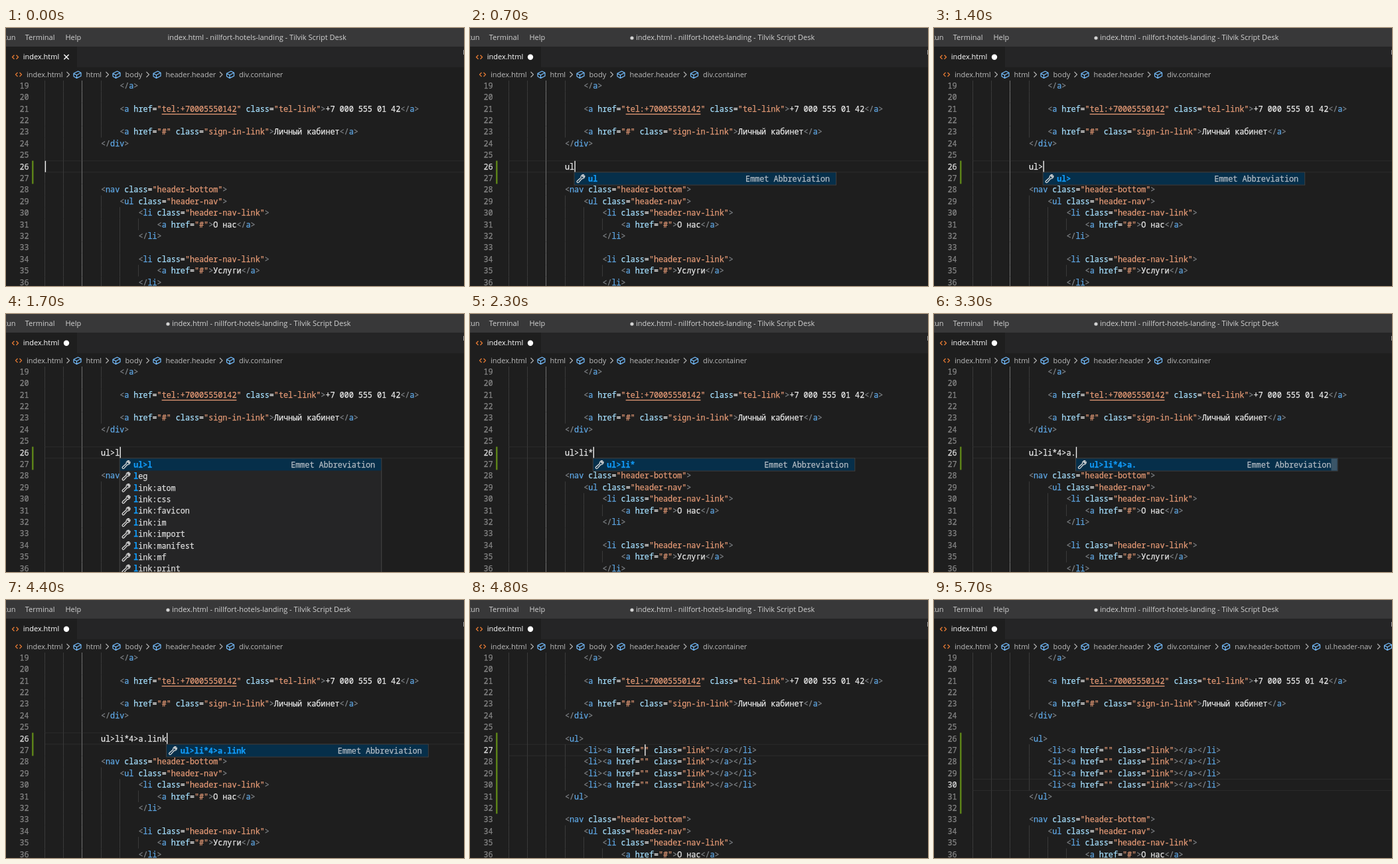
These frames come from a looping animation (690x388 px, 5800 ms). An HTML page with a canvas:

```html
<!DOCTYPE html>
<html lang="en">
<head>
<meta charset="utf-8">
<title>Editor</title>
<style>
html, body { margin: 0; width: 100%; height: 100%; overflow: hidden; background: #1e1e1e; }
canvas { display: block; width: 690px; height: 388px; }
</style>
</head>
<body>
<canvas id="stage"></canvas>
<script>
const W = 690, H = 388, LOOP = 5800;
const X0 = 58.4, CW = 7.05, LH = 17.4;
const MONO = '"Noto Sans Mono", monospace';
const UI = '11px "Open Sans", sans-serif';
const PROJECT = 'nillfort-hotels-landing - Tilvik Script Desk';

const canvas = document.getElementById('stage');
const ctx = canvas.getContext('2d');
const dpr = window.devicePixelRatio || 1;
canvas.width = W * dpr;
canvas.height = H * dpr;

const COLOR = {
  bracket: '#82868a', tag: '#5fa8e6', attr: '#a6e0ff',
  string: '#e59a76', text: '#ececec', ui: '#d2d2d2', crumb: '#bcbcbc'
};

// Each line: indent level, then code
const head = [
  [4, '</a>'],
  [4, ''],
  [4, '<a href="tel:+70005550142" class="tel-link">+7 000 555 01 42</a>'],
  [4, ''],
  [4, '<a href="#" class="sign-in-link">Личный кабинет</a>'],
  [3, '</div>'],
  [3, '']
];
const nav = [
  [3, '<nav class="header-bottom">'],
  [4, '<ul class="header-nav">'],
  [5, '<li class="header-nav-link">'],
  [6, '<a href="#">О нас</a>'],
  [5, '</li>'],
  [5, ''],
  [5, '<li class="header-nav-link">'],
  [6, '<a href="#">Услуги</a>'],
  [5, '</li>']
];
const item = [4, '<li><a href="" class="link"></a></li>'];
const list = [[3, '<ul>'], item, item, item, item, [3, '</ul>'], [3, '']];

const ABBR = 'ul>li*4>a.link';
const keys = [300, 500, 1200, 1500, 1900, 2000, 2500, 2700, 3000, 3200, 3700, 3900, 4000, 4200];
const INDENT = 200, EXPAND = 4700, CRUMBS = 5200;

const links = ['atom', 'css', 'favicon', 'im', 'import', 'manifest', 'mf', 'print'].map(s => 'link:' + s);
const hints = {
  'ul>l': ['leg', ...links],
  'ul>li': [...links, 'link:rss'],
  'ul>li*4>a': ['a:blank', 'a:link', 'a:mail', 'a:tel', 'abbr', 'acr', 'acronym', 'adr', 'area']
};

const wrench = new Path2D('M-5.6 3.4L0-1.6A3.5 3.5 0 0 1 4.4-5.6L2.2-3.4L3.4-2.2L5.6-4.4A3.5 3.5 0 0 1 1.6 0L-3.4 5.6A1.5 1.5 0 0 1-5.6 3.4Z');
const cube = new Path2D('M-5.5-1.7L1-5L5.5-2.7V2.3L-1 5.4L-5.5 2.8ZM-5.5-1.7L-1 .8L5.5-2.7M-1 .8V5.4');
const chevron = new Path2D('M-2-4L2 0L-2 4');
const angles = new Path2D('M-1.5-3L-4.5 0L-1.5 3M1.5-3L4.5 0L1.5 3');
const cross = new Path2D('M-3.6-3.6L3.6 3.6M3.6-3.6L-3.6 3.6');

const rowY = n => 208.3 + (n - 26) * LH;
const colX = c => X0 + c * CW;

function box(x, y, w, h, color) {
  ctx.fillStyle = color;
  ctx.fillRect(x, y, w, h);
}

function put(str, x, y, color, font = UI, align = 'left') {
  ctx.font = font;
  ctx.textAlign = align;
  ctx.fillStyle = color;
  ctx.fillText(str, x, y);
}

// Monospaced text, thickened slightly by a hairline stroke
function mono(str, x, y, color, weight = 400, align = 'left') {
  put(str, x, y + 4.2, color, weight + ' 11.75px ' + MONO, align);
  ctx.strokeStyle = color;
  ctx.lineWidth = 0.25;
  ctx.strokeText(str, x, y + 4.2);
}

function icon(path, x, y, color, width = 1.2) {
  ctx.save();
  ctx.translate(x, y);
  ctx.strokeStyle = color;
  ctx.lineWidth = width;
  ctx.lineJoin = 'round';
  ctx.stroke(path);
  ctx.restore();
}

function dot(x, y, r, color) {
  ctx.fillStyle = color;
  ctx.beginPath();
  ctx.arc(x, y, r, 0, 7);
  ctx.fill();
}

function drawCode(code, col, y) {
  let inTag = false, afterOpen = false;
  for (const [part] of code.matchAll(/<\/?|"[^"]*"|[a-z]+(?=[^<]*>)|>|=|\s+|[^<>"=\s]+/g)) {
    let color = COLOR.text;
    if (part[0] === '<') {
      color = COLOR.bracket;
      inTag = afterOpen = true;
    } else if (part === '>') {
      color = COLOR.bracket;
      inTag = false;
    } else if (inTag) {
      if (part[0] === '"') color = COLOR.string;
      else if (part !== '=') color = afterOpen ? COLOR.tag : COLOR.attr;
      afterOpen = false;
    }
    mono(part, colX(col), y, color);
    if (part.startsWith('"tel:')) box(colX(col + 1), y + 7.6, (part.length - 2) * CW, 1.3, COLOR.string);
    col += part.length;
  }
}

function drawEditor(lines, current, expanded) {
  box(X0, rowY(current) - 9, W, 1, '#2c2c2c');
  box(X0, rowY(current) + 8, W, 1, '#2c2c2c');
  lines.forEach(([level, code], i) => {
    const n = 19 + i, y = rowY(n);
    for (let g = 0; g < level; g++) {
      const bright = g === 2 && !expanded;
      box(Math.floor(colX(g * 4)), y - LH / 2, 1, LH, bright ? '#707070' : '#3a3a3a');
    }
    mono(n, 34.5, y, n === current ? '#dcdcdc' : '#858585', 400, 'right');
    drawCode(code, level * 4, y);
  });
  box(39, rowY(26) - LH / 2, 2.5, LH * (expanded ? 7 : 2), '#5c8218');
}

function drawPopup(abbr, x, slider) {
  const rows = [abbr, ...(hints[abbr] || [])];
  const match = abbr.match(/[a-z]*$/)[0].length;
  const top = 216.5, height = rows.length > 1 ? 190 : 20;
  box(x - 0.5, top, 395.5, height, '#454545');
  box(x + 0.5, top + 1, 393.5, height - 2, '#252526');
  box(x + 0.5, top + 1, 393.5, 18, '#062f4a');
  if (slider) box(x + 385, top + 1, 9, 18, '#3a5568');
  rows.forEach((row, i) => {
    const y = 226.5 + i * LH, tx = x + 21;
    const lit = i ? match : row.length;
    icon(wrench, x + 10, y, '#dcdcdc', 1.3);
    mono(row.slice(0, lit), tx, y, '#1199f5', 700);
    mono(row.slice(lit), tx + lit * CW, y, '#dcdcdc');
  });
  mono('Emmet Abbreviation', x + 258, 226.5, '#b4bcc4');
}

function drawCrumbs(full) {
  box(0, 59, W, 20, '#1e1e1e');
  icon(angles, 19, 70, '#e37933', 1.3);
  put('index.html', 31, 74.2, COLOR.crumb);
  const crumbs = [['html', 120.5], ['body', 179.5], ['header.header', 240.5], ['div.container', 351]];
  if (full) crumbs.push(['nav.header-bottom', 453], ['ul.header-nav', 589], ['', 697]);
  for (const [name, x] of crumbs) {
    icon(chevron, x - 27, 70, '#b0b0b0', 1.1);
    icon(cube, x - 13, 70, '#75beff', 1.2);
    put(name, x, 74.2, COLOR.crumb);
  }
}

function drawChrome(dirty) {
  box(0, 0, W, 28, '#383839');
  put('Run', 14.5, 18.2, COLOR.ui, UI, 'right');
  put('Terminal', 28.8, 18.2, COLOR.ui);
  put('Help', 89.5, 18.2, COLOR.ui);
  if (dirty) dot(244, 15, 2.6, COLOR.ui);
  put('index.html - ' + PROJECT, dirty ? 250 : 243.5, 18.2, COLOR.ui);

  box(0, 28, W, 31, '#252526');
  box(0, 28, 107, 31, '#1e1e1e');
  icon(angles, 14, 43.7, '#e37933', 1.4);
  put('index.html', 25.7, 47.3, '#ffffff');
  if (dirty) dot(91, 43.7, 4.2, '#ffffff');
  else icon(cross, 91, 43.7, '#ffffff', 1.4);
}

function caret(col, line) {
  box(colX(col) + 0.3, rowY(line) - 8.5, 1.4, 17, '#f0f0f0');
}

function draw(t) {
  ctx.setTransform(dpr, 0, 0, dpr, 0, 0);
  box(0, 0, W, H, '#1e1e1e');
  const expanded = t >= EXPAND;
  const count = keys.filter(k => t >= k).length;
  const typed = ABBR.slice(0, count);
  const stop = Math.max(0, Math.min(7, Math.floor((t - 4800) / 80)));
  const line = expanded ? 27 + (stop >> 1) : 26;
  const body = expanded ? list : [[3, ''], [3, '']];

  drawEditor([...head, ...body, ...nav], line, expanded);
  if (expanded) {
    if (t < 5600) caret(stop % 2 ? 44 : 29, line);
  } else {
    const col = t < INDENT ? 0 : 12 + count;
    mono(typed, colX(12), rowY(26), COLOR.text);
    caret(col, 26);
    // The scroll slider lingers briefly after a long list closes
    const closed = typed.slice(0, -1) in hints && t - keys[count - 1] < 250;
    if (typed) drawPopup(typed, colX(col), closed);
  }
  drawCrumbs(t >= CRUMBS);
  drawChrome(t >= INDENT);
  // Edge of the mouse pointer
  box(689, 33, 1, 7, '#a0a0a0');
}

let start;
function tick(now) {
  if (start === undefined) start = now;
  draw((now - start) % LOOP);
  requestAnimationFrame(tick);
}
requestAnimationFrame(tick);
</script>
</body>
</html>
```
